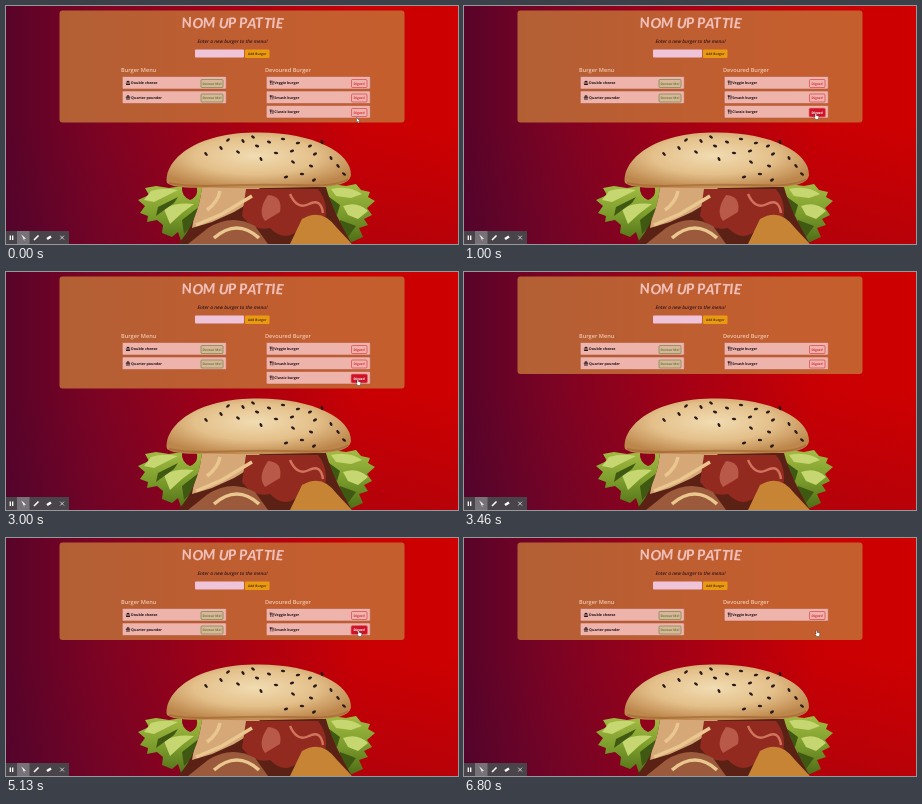
An HTML page for the animation above (7 s loop, 452x238 px).

```html
<!DOCTYPE html>
<html lang="en">
<head>
<meta charset="utf-8">
<title>Burger menu</title>
<style>
html, body { margin: 0; width: 100%; height: 100%; overflow: hidden; background: #a00014; }
svg { display: block; width: 100%; height: 100%; }
text { font-family: "Open Sans", sans-serif; text-rendering: geometricPrecision; }
.title { font: italic 800 14.2px Lato, sans-serif; fill: #f1bfb8; }
.lead { font-size: 4.75px; font-style: italic; font-weight: 600; fill: #32151a; }
.head { font-size: 5.6px; font-weight: 600; fill: #f1c7ae; }
.item { font-size: 3.65px; font-weight: 700; fill: #21151a; }
.btn { font-size: 3.3px; font-weight: 700; text-anchor: middle; }
</style>
</head>
<body>
<svg viewBox="0 0 452 238" preserveAspectRatio="none">
  <defs>
    <linearGradient id="wall">
      <stop stop-color="#580329"/><stop offset=".2" stop-color="#7c0323"/>
      <stop offset=".5" stop-color="#a60014"/><stop offset=".78" stop-color="#c90003"/>
      <stop offset="1" stop-color="#ce0000"/>
    </linearGradient>
    <linearGradient id="shade" x2="0" y2="1">
      <stop offset=".5" stop-color="#300a3c" stop-opacity="0"/>
      <stop offset="1" stop-color="#300a3c" stop-opacity=".14"/>
    </linearGradient>
    <radialGradient id="bun" cx=".48" cy=".42" r=".6">
      <stop stop-color="#f1dcb2"/><stop offset=".55" stop-color="#e4c08a"/>
      <stop offset="1" stop-color="#bd874c"/>
    </radialGradient>
    <linearGradient id="leaf" x2="0" y2="1">
      <stop stop-color="#a4bb43"/><stop offset=".5" stop-color="#7c9d2c"/>
      <stop offset="1" stop-color="#4f6e18"/>
    </linearGradient>
    <clipPath id="stack"><path d="M196 181H320Q326 204 346 238H172Q192 216 196 181Z"/></clipPath>
  </defs>

  <rect width="452" height="238" fill="url(#wall)"/>
  <rect width="452" height="238" fill="url(#shade)"/>

  <g id="burger">
    <g fill="url(#leaf)">
      <path d="M206 180L190 179Q194 190 184 194 175 190 176 180L163 182 150 180 139 182 143 189 132 194 139 200 134 207 142 210 141 216 151 214 157 219 156 227 166 231 172 226 176 238H212Z"/>
      <path d="M300 178L325 178 340 180 350 178 355 184 364 186 362 191 369 195 361 202 366 209 358 213 362 219 353 222 357 231 346 236H310Z"/>
    </g>
    <g fill="#c6d671">
      <path d="M145 185Q157 181 172 184L160 190 148 196 138 194ZM158 203Q170 196 188 198L176 207 164 218ZM325 183Q343 179 356 188L345 192 330 190ZM337 200Q352 195 362 205L352 213 342 209Z"/>
    </g>
    <g fill="#3f5912">
      <path d="M152 201L172 191 168 197 150 210ZM176 214L194 200 190 216 178 228ZM319 188L334 199 331 209 322 202ZM334 214L350 220 342 231 331 224Z"/>
    </g>
    <g clip-path="url(#stack)">
      <rect x="170" y="176" width="180" height="62" fill="#5b2115"/>
      <path d="M194 180H255Q247 196 228 206L206 216 186 222Z" fill="#d6a878"/>
      <path d="M240 183H312Q324 198 318 218 303 209 294 222 280 238 264 222 248 226 236 210Z" fill="#922a20"/>
      <path d="M262 189Q277 190 274 206L259 215Q251 205 262 189Z" fill="#b95949"/>
      <path d="M296 213Q316 201 331 222L346 238H284Z" fill="#c78435"/>
      <path d="M202 222Q226 207 249 220L262 238H182Z" fill="#9c5a3c"/>
      <path d="M190 219L216 208 246 190M208 232Q231 212 253 232M214 185Q212 196 201 204" fill="none" stroke="#e9c78e" stroke-width="3.500"/>
      <path d="M284 188Q291 204 303 198T317 207" fill="none" stroke="#d0745c" stroke-width="2.500"/>
    </g>
    <path d="M161 177C158 157 184 128 247 126.500C305 125 346 146 345 169C344 178 329 181 309 181Q254 183 203 181.500Q168 183 161 177Z" fill="url(#bun)"/>
    <path d="M163 177Q181 181 218 179.500T309 179.500Q333 179 342 173" fill="none" stroke="#a1632f" stroke-width="2" opacity=".6"/>
    <g id="seeds" fill="#2b1b18"/>
  </g>

  <rect id="panel" x="53.500" y="4.500" width="345" rx="3" fill="#c57639" fill-opacity=".8"/>
  <text class="title" x="226.500" y="22" text-anchor="middle" rotate="-5 3 -3 0 4 -4 0 -3 4 -4 3 -2 4">NOM UP PATTIE</text>
  <text class="lead" x="226.500" y="37.300" text-anchor="middle">Enter a new burger to the menu!</text>
  <rect x="189" y="43.500" width="49" height="8" rx="1" fill="#efc3d8"/>
  <rect x="239" y="43.500" width="24.500" height="8.500" rx="1" fill="#e99a10"/>
  <text class="btn" x="251.200" y="49.200" fill="#563300">Add Burger</text>
  <text class="head" x="115" y="66.300">Burger Menu</text>
  <text class="head" x="259" y="66.300">Devoured Burger</text>
  <g id="rows"></g>

  <g id="bar">
    <rect y="225" width="63" height="13" fill="#494449"/>
    <rect x="11" y="225" width="12.500" height="13" fill="#777277"/>
    <g stroke="#fff" stroke-width="1.300" fill="#fff">
      <path d="M4.300 229.500V234M6.700 229.500V234"/>
      <path d="M15.500 229L19.500 232.500 17.500 232.700 18.400 234.500" stroke-width=".5"/>
      <path d="M28 234L32.500 229.500" stroke-width="1.600"/>
      <path d="M41 233L45 230.500" stroke-width="2.600"/>
      <path d="M54.200 229.700L58 233.500M58 229.700L54.200 233.500" stroke-width=".7"/>
    </g>
  </g>

  <path id="arrow" d="M0 0V5L1.200 4 2 5.700 2.900 5.300 2.200 3.700H3.700Z" fill="#fff" stroke="#222" stroke-width=".4"/>
  <path id="hand" d="M0 0Q.7-.5 1.100.2L1.400 2 3.300 2.400Q4 2.700 3.800 3.700L3.300 6H.8L-1 3.600Q-.8 2.900 0 3.400Z" fill="#fff" stroke="#222" stroke-width=".4"/>
</svg>
<script>
const LOOP = 7000;
const $ = id => document.getElementById(id);
const ramp = (t, from, span) => Math.max(0, Math.min(1, (t - from) / span));
const ease = k => k * k * (3 - 2 * k);
const fade = (t, from) => ease(ramp(t, from, 150));
const mix = (a, b, k) => a + (b - a) * k;
const show = (el, on) => el.setAttribute('visibility', on ? 'visible' : 'hidden');

const seeds = [222,134, 237,135, 247,131, 263,136, 277,133, 292,137, 304,140, 316,136,
  215,142, 232,146, 251,140, 270,147, 286,145, 309,148, 325,152, 332,160, 287,156,
  305,160, 296,168, 280,171, 308,174, 255,153, 200,148, 338,168];
for (let i = 0; i < seeds.length; i += 2) {
  const [x, y] = [seeds[i], seeds[i + 1]];
  $('seeds').innerHTML += `<ellipse cx="${x}" cy="${y}" rx="2.2" ry="1.3" transform="rotate(${(i * 47) % 110 - 40} ${x} ${y})"/>`;
}

const bunIcon = 'M.3 1.700Q2.200-1.200 4.100 1.700ZM0 2.200H4.400V3H0ZM.3 3.500H4.100V4.400H.3Z';
const forkIcon = 'M0 0H.5V1.300H.8V0H1.300V1.300H1.600V0H2V1.800L1.400 2.300V4.600H.7V2.300L0 1.800ZM2.700 0Q4 .2 3.800 2.700H3.500V4.600H2.800Z';

function row(name, x, i, devoured) {
  const y = 70.5 + i * 14.5;
  const [bx, bw, color, label] = devoured
    ? [345.5, 15.5, '#d92c3d', 'Digest!']
    : [195, 22, '#55843f', 'Devour Me!'];
  const g = document.createElementNS('http://www.w3.org/2000/svg', 'g');
  g.innerHTML = `
    <rect x="${x}" y="${y}" width="104" height="12.5" rx="1" fill="#eeb3aa" stroke="#a85135" stroke-width=".5"/>
    <path d="${devoured ? forkIcon : bunIcon}" transform="translate(${x + 3.5} ${y + 4})" fill="#21151a"/>
    <text class="item" x="${x + (devoured ? 8 : 8.8)}" y="${y + 7.7}">${name}</text>
    <rect class="ring" x="${bx - .8}" y="${y + 2.2}" width="${bw + 1.6}" height="9.6" rx="1.6" fill="#dc3545" opacity="0"/>
    <rect x="${bx}" y="${y + 3}" width="${bw}" height="8" rx="1" fill="${devoured ? '#eeb3aa' : '#dcb497'}" stroke="${color}" stroke-width=".6"/>
    <rect class="fill" x="${bx}" y="${y + 3}" width="${bw}" height="8" rx="1" fill="#cf1227" opacity="0"/>
    <text class="btn" x="${bx + bw / 2}" y="${y + 8.3}" fill="${color}">${label}</text>
    <text class="btn on" x="${bx + bw / 2}" y="${y + 8.3}" fill="#fff" opacity="0">${label}</text>`;
  $('rows').append(g);
  return g;
}

row('Double cheese', 116.3, 0);
row('Quarter pounder', 116.3, 1);
row('Veggie burger', 260.3, 0, true);
const smash = row('Smash burger', 260.3, 1, true);
const classic = row('Classic burger', 260.3, 2, true);

function pose(g, hover, focus, visible) {
  g.style.display = visible ? '' : 'none';
  g.querySelector('.ring').setAttribute('opacity', focus * .5);
  g.querySelector('.fill').setAttribute('opacity', hover);
  g.querySelector('.on').setAttribute('opacity', hover);
}

function draw(now) {
  const t = now % LOOP;
  const three = t < 3130;
  pose(classic, fade(t, 260), fade(t, 730), three);
  pose(smash, fade(t, 4260), fade(t, 4860), t < 6730);
  $('panel').setAttribute('height', three ? 112 : 97.5);

  const k = ease(ramp(t, 60, 400));
  const second = t >= 4530;
  const x = second ? 352 : mix(350.5, 351, k);
  const y = second ? 92.5 : mix(111.5, 107.5, k);
  const shown = t < 3460 || second;
  const overButton = t >= 260;
  for (const id of ['arrow', 'hand']) $(id).setAttribute('transform', `translate(${x} ${y})`);
  show($('arrow'), shown && !overButton);
  show($('hand'), shown && overButton);
}

const start = performance.now();
function tick() {
  draw(performance.now() - start);
  requestAnimationFrame(tick);
}
tick();
</script>
</body>
</html>
```
